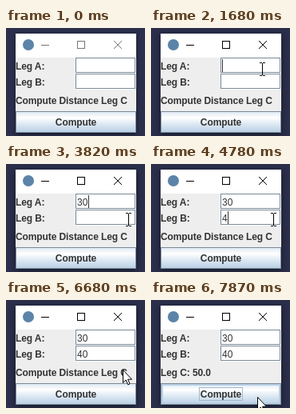
An HTML page that plays this animation: 174x135 px, repeating every 8.18 s.

```html
<!DOCTYPE html>
<html lang="en">
<head>
<meta charset="utf-8">
<title>Leg calculator</title>
<style>
html, body { margin: 0; width: 100%; height: 100%; overflow: hidden; background: #2b2f4b; }
svg { display: block; width: 174px; height: 135px; shape-rendering: crispEdges; }
text { font: 12px "Liberation Sans", Arial, sans-serif; fill: #333; white-space: pre; }
.bold { font-weight: bold; letter-spacing: -.1px; }
.smooth { shape-rendering: geometricPrecision; }
</style>
</head>
<body>
<svg viewBox="0 0 174 135">
  <defs>
    <linearGradient id="metal" x2="0" y2="1">
      <stop stop-color="#dde8f3"/>
      <stop offset=".3" stop-color="#fff"/>
      <stop offset=".6" stop-color="#dde8f3"/>
      <stop offset="1" stop-color="#b8cfe5"/>
    </linearGradient>
    <g id="field">
      <rect width="76" height="20" fill="#fff"/>
      <rect x=".5" y=".5" width="74" height="18" fill="none" stroke="#7a8a99"/>
    </g>
  </defs>
  <rect width="174" height="135" fill="#2b2f4b"/>
  <rect id="frame" x="12" y="7" width="151" height="124" fill="#eee"/>
  <rect x="12" y="7" width="151" height="30" fill="#fff"/>
  <circle class="smooth" cx="28" cy="21" r="7" fill="#5b84a8"/>
  <path id="controls" fill="none" d="M44 21.5h10M89.5 16.5h9v9h-9z"/>
  <path id="close" class="smooth" fill="none" d="M135 16l10 10m0-10l-10 10"/>

  <text class="bold" x="12" y="52">Leg A:</text>
  <text class="bold" x="12" y="72">Leg B:</text>
  <use href="#field" x="87" y="37"/>
  <use href="#field" x="87" y="57"/>
  <text id="legA" x="89" y="52"></text>
  <text id="legB" x="89" y="72"></text>
  <rect id="caret" width="1" height="16" fill="#333"/>
  <text id="result" class="bold" x="12" y="95"></text>

  <rect id="button" x="12.5" y="104.5" width="150" height="26" stroke="#7a8a99"/>
  <rect id="hover" x="14" y="106" width="147" height="23" fill="none" stroke="#b8cfe5" stroke-width="2"/>
  <rect id="focus" x="60.5" y="109.5" width="54" height="16" fill="none" stroke="#a3b8cc"/>
  <text class="bold" x="87.5" y="122" text-anchor="middle">Compute</text>

  <g id="pointer">
    <circle id="click" class="smooth" r="11.5" fill="#e2e044" opacity=".82"/>
    <path id="beam" d="M-3 -7.5h3m1 0h3M-3 8.5h3m1 0h3M.5 -7v15" fill="none" stroke="#000"/>
    <path id="arrow" class="smooth" d="M.5 .5v16l3.7-3.5 2.5 5.8 2.3-1-2.5-5.6h5z" fill="#fff" stroke="#000"/>
  </g>
</svg>
<script>
const LOOP = 8180;
const $ = id => document.getElementById(id);
const show = (id, on) => $(id).setAttribute("visibility", on ? "visible" : "hidden");
const set = (id, name, value) => $(id).setAttribute(name, value);
const within = (t, spans) => spans.some(([a, b]) => t >= a && t < b);

// Pointer stops: time, x, y
const route = [
  [0, -20, 80], [160, -12, 79], [560, 38, 74], [720, 38, 74],
  [1200, 145, 57], [1520, 139, 51], [2950, 139, 51], [3270, 144, 52],
  [3350, 144, 52], [3430, 140, 51], [3560, 140, 51], [3820, 153, 69],
  [6520, 153, 69], [6920, 133, 121], [LOOP, 133, 121]
];
const clicks = [[1600, 1680], [4060, 4140], [7000, 7160]];
const caretOn = [[1600, 2070], [2470, 3270], [3780, 4540], [4780, 5570], [6100, 6570]];

function position(t) {
  const i = route.findIndex(stop => stop[0] > t);
  const [t0, x0, y0] = route[i - 1], [t1, x1, y1] = route[i];
  const p = (t - t0) / (t1 - t0), k = p * p * (3 - 2 * p);
  return [x0 + (x1 - x0) * k, y0 + (y1 - y0) * k].map(Math.round);
}

// Text typed so far, one key time per character
const typed = (t, word, times) => word.slice(0, times.filter(k => t >= k).length);

function draw(now) {
  const t = now % LOOP;
  const [x, y] = position(t);
  const active = t >= 1600, inB = t >= 4060;
  const pressed = t >= 7000 && t < 7160;

  for (const id of ["controls", "close"]) set(id, "stroke", active ? "#000" : "#777");
  $("frame").style.filter = `drop-shadow(0 2px ${active ? 4 : 2}px rgba(0,0,0,.5))`;

  const a = typed(t, "30", [2470, 2780]);
  const b = typed(t, "40", [4780, 5060]);
  $("legA").textContent = a;
  $("legB").textContent = b;
  $("result").textContent = t < 7160 ? "Compute Distance Leg C" : "Leg C: 50.0";
  set("caret", "x", 89 + 7 * (inB ? b : a).length);
  set("caret", "y", inB ? 59 : 39);
  show("caret", within(t, caretOn));

  set("button", "fill", pressed ? "#b8cfe5" : "url(#metal)");
  show("hover", y >= 104 && !pressed);
  show("focus", t >= 7000);

  const overField = x >= 87 && x < 162 && y >= 37 && y < 77;
  set("pointer", "transform", `translate(${x} ${y})`);
  show("beam", overField);
  show("arrow", !overField);
  show("click", within(t, clicks));
  requestAnimationFrame(tick);
}

let start;
function tick(now) {
  start ??= now;
  draw(now - start);
}
requestAnimationFrame(tick);
</script>
</body>
</html>
```
